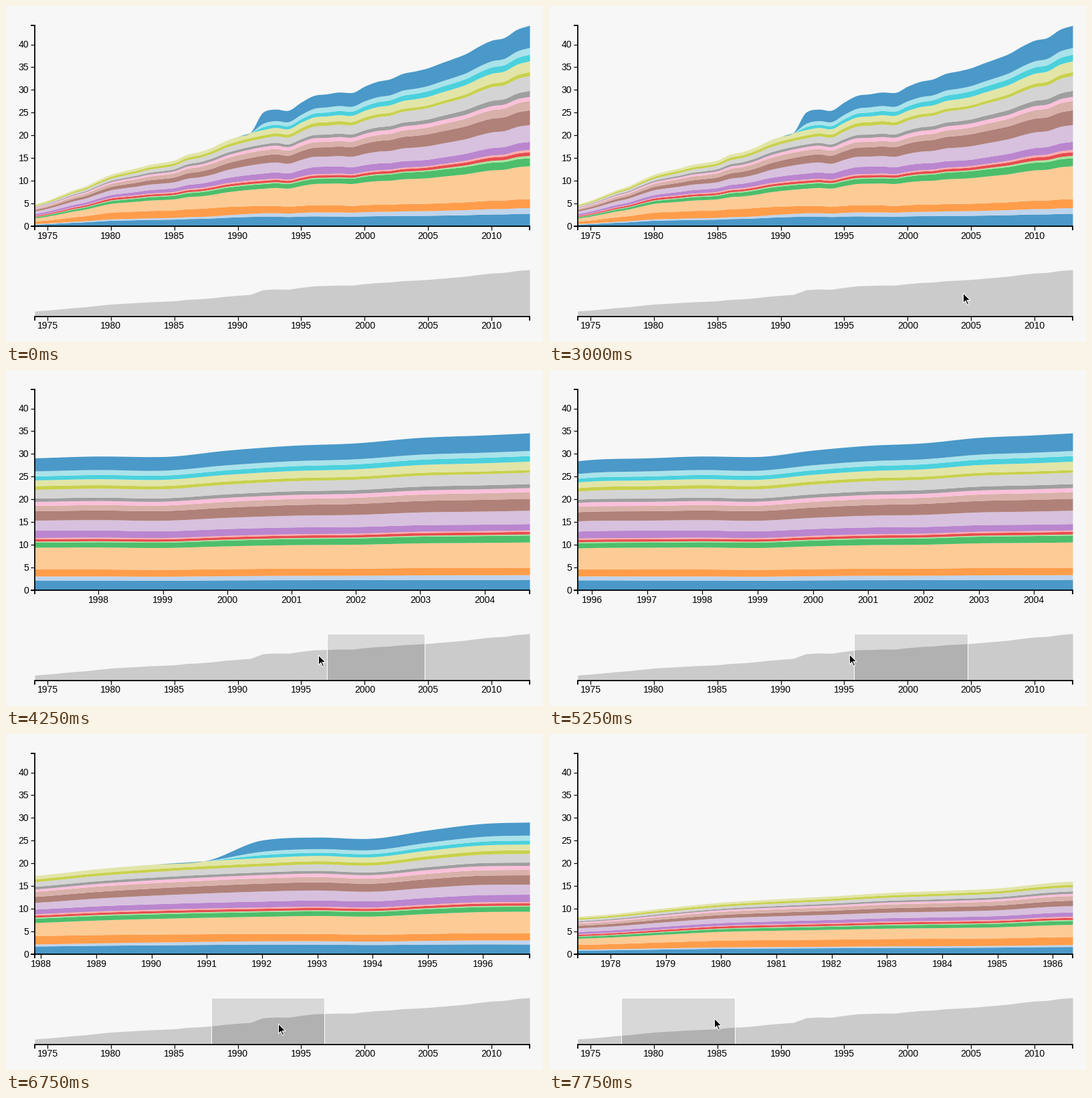
A matplotlib script that plays this animation: 803 px wide and 502 px high, repeating every 8 s.

```python
import math

import matplotlib.pyplot as plt
import numpy as np
from matplotlib.animation import FuncAnimation
from matplotlib.patches import Polygon, Rectangle

W, H, DPI = 803, 502, 64
PT = 72 / DPI                       # points per pixel
LEFT, RIGHT, TOP, BASE = 43, 783, 29, 329
MINI_TOP, MINI_BASE = 394, 463.5
FIRST, LAST = 1974, 2013
PEAK = 44.2
PER_YEAR = (RIGHT - LEFT) / (LAST - FIRST)
FRAMES, STEP = 32, 250

MONTHS = {1: "April", 2: "July", 3: "October"}

TOTALS = np.array([
    4.85, 5.7, 6.8, 7.95, 8.85, 10.2, 11.4, 12.15, 12.8, 13.55,
    14.0, 14.55, 15.8, 16.4, 17.4, 18.75, 19.75, 20.65, 25.1, 25.75,
    25.5, 27.3, 28.75, 29.1, 29.5, 29.4, 30.8, 31.85, 32.4, 33.6,
    34.15, 34.85, 35.9, 36.9, 38.0, 39.6, 40.9, 41.5, 43.3, 44.2])

# Relative thickness of each band at the knot years, bottom to top
KNOTS = [1974, 1980, 1988, 1992, 1997, 2004.7, 2013]
BANDS = [
    ("#4a99c9", (3, 8.5, 12, 15, 15, 16, 19)),
    ("#bfd4ec", (1, 2, 3, 5, 6, 7, 8.5)),
    ("#ff9d4b", (4, 10, 12.5, 11, 10.5, 11, 13.5)),
    ("#fdcb96", (5, 13, 19.5, 26, 32.5, 38, 49)),
    ("#4dbe6b", (2, 4, 6.5, 7, 7.5, 10.5, 12)),
    ("#a8e6a0", (.5, 1, 1.5, 1.5, 1.5, 1.5, 3.5)),
    ("#e84c4f", (1.5, 3, 3, 3.5, 3.5, 4, 5.5)),
    ("#fdacab", (.5, 1, 2, 2, 2, 2, 3.5)),
    ("#ba86cf", (3, 4, 7, 9, 11, 9.5, 12)),
    ("#d7c1de", (4, 7, 10, 15, 15, 20, 25)),
    ("#b08179", (2.5, 5, 9, 12, 14, 18, 22)),
    ("#d8b1aa", (2, 4.5, 7.5, 8, 8, 10, 14)),
    ("#fbc0db", (1.5, 2.5, 3.5, 5, 6, 6, 6)),
    ("#9f9f9f", (1, 2, 4, 4, 5, 6, 9)),
    ("#d4d4d4", (1.5, 3, 7, 9, 13, 17, 22)),
    ("#c9d14d", (1.5, 3, 4, 4.5, 5.5, 4, 6)),
    ("#e2e5a8", (1.5, 3, 5, 8, 8.5, 12.5, 16)),
    ("#4bd1dd", (0, 0, 0, 4.5, 6, 8.5, 10)),
    ("#aae3ea", (0, 0, 0, 5, 7.5, 7.5, 10)),
    ("#4a99c9", (0, 0, 0, 17, 19.5, 26.5, 33)),
]
LATE = 3                            # top bands that only start in 1991

# Pointer: first seen at step 5, one place per step from there
POINTER_START = 5
POINTER = [(571, 452)] + [(596, 428)] * 2 + [(608, 428)] * 3 + [
    (616, 428), (619, 428), (619, 428),
    (558, 425), (528, 424), (495, 424), (467, 425), (457, 425),
    (452, 424), (450, 424), (449, 424),
    (569, 428), (576, 428), (594, 428), (596, 428),
    (520, 430), (407, 432), (372, 430), (322, 428), (281, 426), (247, 424)]

# Brush: the left edge is pulled out, rests, then the whole brush is dragged
BRUSH_START, DRAG_START = 14, 26
BRUSH_END = 625.5
PULL = [567, 536.55, 506, 479.6, 467, 459.5, 457.4, 455.6]
DRAG = [402.3, 306.5, 249.5, 198, 150, 107.6]


def band_edges():
    """Stacked band boundaries for every year."""
    years = np.arange(FIRST, LAST + 1)
    thick = np.array([np.interp(years, KNOTS, row) for _, row in BANDS])
    thick[-LATE:] *= np.interp(years, [1990, 1991, 1992], [0, .03, 1])
    thick *= TOTALS / thick.sum(axis=0)
    return np.vstack([np.zeros(len(years)), thick.cumsum(axis=0)])


def monotone_slopes(v):
    """Tangents of a monotone cubic through unit-spaced values."""
    d = np.diff(v)
    m = np.concatenate([d[:1], (d[:-1] + d[1:]) / 2, d[-1:]])
    for i, slope in enumerate(d):
        if abs(slope) < 1e-9:
            m[i] = m[i + 1] = 0
            continue
        a, b = m[i] / slope, m[i + 1] / slope
        s = a * a + b * b
        if s > 9:
            k = 3 * slope / math.sqrt(s)
            m[i], m[i + 1] = k * a, k * b
    return m


EDGES = band_edges()
SLOPES = np.array([monotone_slopes(e) for e in EDGES])


def edges_at(years):
    pos = years - FIRST
    i = np.clip(pos.astype(int), 0, LAST - FIRST - 1)
    t = pos - i
    return (EDGES[:, i] * (1 + 2 * t) * (1 - t) ** 2
            + SLOPES[:, i] * t * (1 - t) ** 2
            + EDGES[:, i + 1] * t * t * (3 - 2 * t)
            + SLOPES[:, i + 1] * t * t * (t - 1))


def value_y(v):
    return BASE - v * (BASE - TOP) / PEAK


def year_x(year, lo=FIRST, hi=LAST):
    return LEFT + (year - lo) * (RIGHT - LEFT) / (hi - lo)


def x_year(x):
    return FIRST + (x - LEFT) / PER_YEAR


def year_ticks(lo, hi):
    """Tick years and labels: every five years, year or quarter."""
    span = hi - lo
    step = 5 if span > 15 else 1 if span > 5 else .25
    for n in range(math.ceil(lo / step), math.floor(hi / step) + 1):
        year = n * step
        quarter = round(year % 1 * 4)
        yield year, MONTHS.get(quarter, str(int(year)))


fig = plt.figure(figsize=(W / DPI, H / DPI), dpi=DPI, facecolor="#f7f7f7")
ax = fig.add_axes([0, 0, 1, 1])
ax.set_xlim(0, W)
ax.set_ylim(H, 0)
ax.axis("off")
bounds = Rectangle((0, 0), RIGHT, H, transform=ax.transData)


def line(xs, ys, width):
    return ax.plot(xs, ys, color="black", lw=width * PT, zorder=4,
                   solid_capstyle="butt", solid_joinstyle="miter",
                   clip_path=bounds)[0]


def label(x, y, text, ha="center"):
    return ax.text(x, y, text, ha=ha, va="baseline", color="black",
                   family="Liberation Sans", size=14 * PT, zorder=4)


def time_ticks(base, lo, hi):
    made = []
    for year, text in year_ticks(lo, hi):
        x = year_x(year, lo, hi)
        made += [line([x, x], [base, base + 6], 1.2),
                 label(x, base + 19, text)]
    return made


def draw_frame():
    for base in (BASE, MINI_BASE):
        line([LEFT, LEFT, RIGHT, RIGHT], [base + 6, base, base, base + 6], 1.8)
    line([LEFT - 6, LEFT, LEFT, LEFT - 6], [TOP, TOP, BASE, BASE], 1.8)
    for v in range(0, 41, 5):
        y = value_y(v)
        line([LEFT - 6, LEFT], [y, y], 1.2)
        label(LEFT - 9, y + 4.8, str(v), "right")
    years = np.arange(FIRST, LAST + 1)
    tops = MINI_BASE - TOTALS / PEAK * (MINI_BASE - MINI_TOP)
    ax.fill_between(year_x(years), MINI_BASE, tops, color="#cbcbcb",
                    lw=0, zorder=1)
    time_ticks(MINI_BASE, FIRST, LAST)


def draw_bands(lo, hi):
    years = np.linspace(lo, hi, 741)
    ys = value_y(edges_at(years))
    xs = year_x(years, lo, hi)
    return [ax.fill_between(xs, ys[i], ys[i + 1], color=color, lw=0, zorder=1)
            for i, (color, _) in enumerate(BANDS)]


def draw_brush(x0, x1):
    box = (x0, MINI_TOP), x1 - x0, MINI_BASE - MINI_TOP
    return [ax.add_patch(Rectangle(*box, fc=(0, 0, 0, .125), ec="none",
                                   zorder=2)),
            ax.add_patch(Rectangle(*box, fc="none", ec="white", lw=PT,
                                   zorder=2))]


def draw_pointer(x, y):
    rim = [(0, 0), (0, 16.6), (3.8, 13.2), (6.3, 19), (9.2, 17.8),
           (6.8, 12.2), (12, 12.2)]
    core = [(1, 2.4), (1, 14.3), (4.1, 11.5), (6.8, 17.6), (7.9, 17.1),
            (5.3, 11.1), (9.6, 11.1)]
    return [ax.add_patch(Polygon(np.add(pts, (x, y)), fc=color, ec="none",
                                 zorder=6))
            for pts, color in ((rim, "white"), (core, "black"))]


def brush_at(step):
    if step < BRUSH_START:
        return None
    if step < DRAG_START:
        return PULL[min(step - BRUSH_START, len(PULL) - 1)], BRUSH_END
    x0 = DRAG[step - DRAG_START]
    return x0, x0 + BRUSH_END - PULL[-1]


draw_frame()
moving = []


def update(step):
    while moving:
        moving.pop().remove()
    brush = brush_at(step)
    lo, hi = FIRST, LAST
    if brush:
        lo, hi = map(x_year, brush)
        moving.extend(draw_brush(*brush))
    moving.extend(draw_bands(lo, hi))
    moving.extend(time_ticks(BASE, lo, hi))
    if step >= POINTER_START:
        moving.extend(draw_pointer(*POINTER[step - POINTER_START]))
    return moving


anim = FuncAnimation(fig, update, frames=FRAMES, interval=STEP, repeat=True,
                     repeat_delay=0, blit=False)
plt.show()
```
